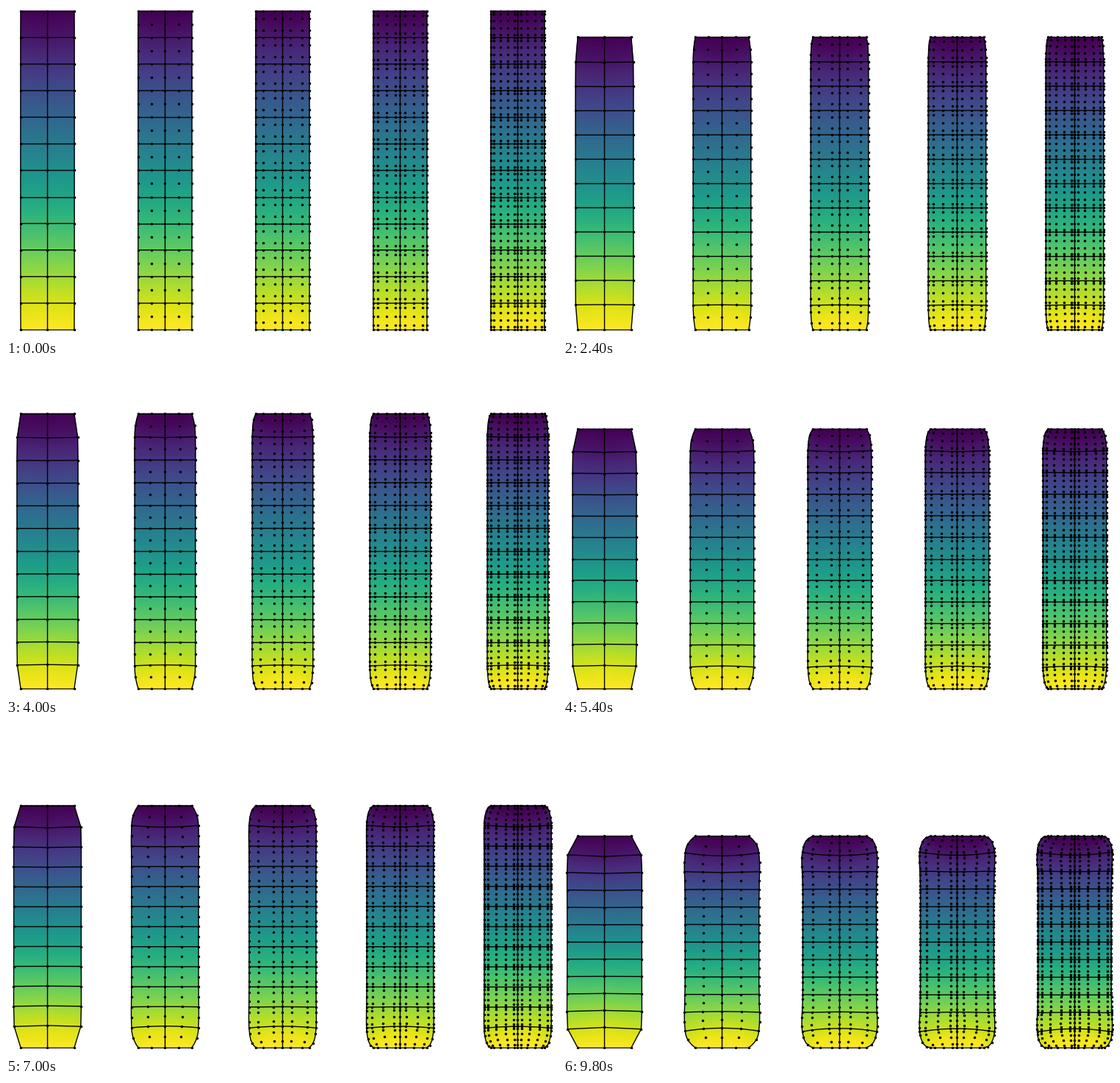
Animation of 750x450 px, one loop 10000 ms. Source, as a matplotlib script:

```python
"""Clamped hyperelastic bars under compression, element orders 1 to 5.

Colour shows the vertical displacement, scaled to its range at each step.
"""
import numpy as np
from numpy.polynomial import legendre as leg
import matplotlib.pyplot as plt
from matplotlib.animation import FuncAnimation
from matplotlib.collections import LineCollection

W, H, FLOOR, DPI = 750, 450, 441, 100
FRAMES, INTERVAL = 50, 200
ORDERS = range(1, 6)
ROWS = 12                       # elements along a bar, two across
HALF = ROWS // 2
UNIT = 36.38                    # element size in pixels
BASE, LEFT, PITCH = 440.2, 56.45, 160
STEP = 2.975 / UNIT             # shortening per load step
MU, LAM = 1.0, 9.0              # Poisson ratio 0.45
SUB = 5                         # drawn pieces per element side


def lobatto(p):
    inner = leg.Legendre.basis(p).deriv().roots() if p > 1 else []
    return np.concatenate([[-1.0], np.sort(np.real(inner)), [1.0]])


def lagrange(p, x):
    """Values and slopes of the nodal basis at the points x."""
    inv = np.linalg.inv(leg.legvander(lobatto(p), p))
    slope = np.array([leg.legval(x, leg.legder(c)) for c in np.eye(p + 1)]).T
    return leg.legvander(x, p) @ inv, slope @ inv


def strain_operator(p):
    """Maps element displacements to the displacement gradient."""
    gx, gw = leg.leggauss(p + 1)
    val, der = lagrange(p, gx)
    n = (p + 1) ** 2
    dx = 2 * np.einsum("ra,sb->rsab", val, der).reshape(n, n)
    dy = 2 * np.einsum("ra,sb->rsab", der, val).reshape(n, n)
    op = np.zeros((n, 2, 2, n, 2))
    for i in range(2):
        op[:, i, 0, :, i] = dx
        op[:, i, 1, :, i] = dy
    return op.reshape(n, 4, 2 * n), np.outer(gw, gw).ravel() / 4


def deformation(op, ue):
    grad = np.einsum("qmn,en->eqm", op, ue)
    return grad.reshape(grad.shape[:2] + (2, 2)) + np.eye(2)


def material(F):
    """Neo-Hookean stress and tangent."""
    lnj = np.log(np.linalg.det(F))[..., None, None]
    inv = np.linalg.inv(F)
    inv_t = np.swapaxes(inv, -1, -2)
    stress = MU * (F - inv_t) + LAM * lnj * inv_t
    tangent = LAM * np.einsum("...ij,...kl->...ijkl", inv_t, inv_t)
    swap = np.einsum("...jk,...li->...ijkl", inv, inv)
    tangent += (MU - LAM * lnj)[..., None, None] * swap
    tangent += MU * np.einsum("ik,jl->ijkl", np.eye(2), np.eye(2))
    lead = F.shape[:2]
    return stress.reshape(lead + (4,)), tangent.reshape(lead + (4, 4))


def solve_quarter(p):
    """Rest nodes and displacements of the upper right quarter, per frame."""
    nx, ny = p + 1, HALF * p + 1
    side = (lobatto(p) + 1) / 2
    ys = np.append(np.add.outer(np.arange(HALF), side[:-1]).ravel(), HALF)
    rest = np.stack(np.meshgrid(side, ys), axis=-1)
    ids = np.arange(nx * ny).reshape(ny, nx)
    dofs = []
    for e in range(HALF):
        nodes = ids[e * p:e * p + p + 1].ravel()
        dofs.append(np.stack([2 * nodes, 2 * nodes + 1], 1).ravel())
    dofs = np.array(dofs)

    fixed = np.zeros((ny, nx, 2), bool)
    fixed[:, 0, 0] = True       # symmetry axes
    fixed[0, :, 1] = True
    fixed[-1] = True            # clamped end
    free = np.flatnonzero(~fixed.ravel())

    op, wq = strain_operator(p)
    flat = op.reshape(-1, op.shape[2])
    size = 2 * nx * ny
    start = np.zeros_like(rest)
    start[..., 1] = -rest[..., 1] * STEP / 2 / HALF
    u = start.ravel()
    moves = []
    for k in range(1, FRAMES + 1):
        if k > 1:
            u = u * k / (k - 1)
        for _ in range(15):
            stress, tangent = material(deformation(op, u[dofs]))
            stress = stress * wq[:, None]
            half = (tangent * wq[:, None, None]) @ op
            force = np.zeros(size)
            stiff = np.zeros((size, size))
            for e, d in enumerate(dofs):
                force[d] += flat.T @ stress[e].ravel()
                stiff[np.ix_(d, d)] += flat.T @ half[e].reshape(flat.shape)
            delta = np.zeros(size)
            delta[free] = np.linalg.solve(stiff[np.ix_(free, free)],
                                          -force[free])
            for _ in range(12):
                if np.linalg.det(deformation(op, (u + delta)[dofs])).min() > 0:
                    break
                delta /= 2
            u = u + delta
            if np.abs(delta).max() < 1e-6:
                break
        moves.append(u.reshape(rest.shape))
    return rest, moves


def unfold(quarter):
    """Mirror the quarter into a full bar, top row first."""
    x, y = quarter[..., 0], quarter[..., 1]
    x = np.vstack([x[::-1], x[1:]])
    y = np.vstack([y[::-1], -y[1:]])
    return np.hstack([-x[:, :0:-1], x]), np.hstack([y[:, :0:-1], y])


def refine_matrix(p, count):
    val, _ = lagrange(p, np.linspace(-1, 1, SUB + 1))
    mat = np.zeros((count * SUB + 1, count * p + 1))
    for e in range(count):
        mat[e * SUB:(e + 1) * SUB + 1, e * p:(e + 1) * p + 1] = val
    return mat


bars = [solve_quarter(p) for p in ORDERS]
refine = [(refine_matrix(p, ROWS), refine_matrix(p, 2)) for p in ORDERS]

fig = plt.figure(figsize=(W / DPI, H / DPI), dpi=DPI, facecolor="white")
ax = fig.add_axes([0, 1 - FLOOR / H, 1, FLOOR / H])
ax.set_xlim(0, W)
ax.set_ylim(FLOOR, 0)
ax.axis("off")
edges = LineCollection([], colors="black", linewidths=1, zorder=2)
ax.add_collection(edges, autolim=False)
dots, = ax.plot([], [], "k.", ms=3, zorder=3)
fills = []


def update(k):
    while fills:
        fills.pop().remove()
    reach = (k + 1) * STEP / 2          # travel of each end from the middle
    middle = BASE - UNIT * (HALF - reach)
    lines, px, py = [], [], []
    for b, ((rest, moves), (down, across)) in enumerate(zip(bars, refine)):
        x, y = unfold(rest + moves[k])
        x = LEFT + PITCH * b + UNIT * x
        y = middle - UNIT * y
        px.append(x.ravel())
        py.append(y.ravel())
        fx, fy, lift = (down @ a @ across.T
                        for a in (x, y, unfold(moves[k])[1]))
        fills.append(ax.pcolormesh(fx, fy, lift, shading="gouraud",
                                   cmap="viridis", vmin=-reach, vmax=reach,
                                   zorder=1))
        pts = np.stack([fx, fy], axis=-1)
        lines += list(pts[::SUB]) + [pts[:, c] for c in (0, SUB, 2 * SUB)]
    edges.set_segments(lines)
    dots.set_data(np.concatenate(px), np.concatenate(py))
    return [*fills, edges, dots]


anim = FuncAnimation(fig, update, frames=FRAMES, interval=INTERVAL,
                     init_func=lambda: update(0), repeat=True,
                     repeat_delay=0, blit=False)
plt.show()
```
